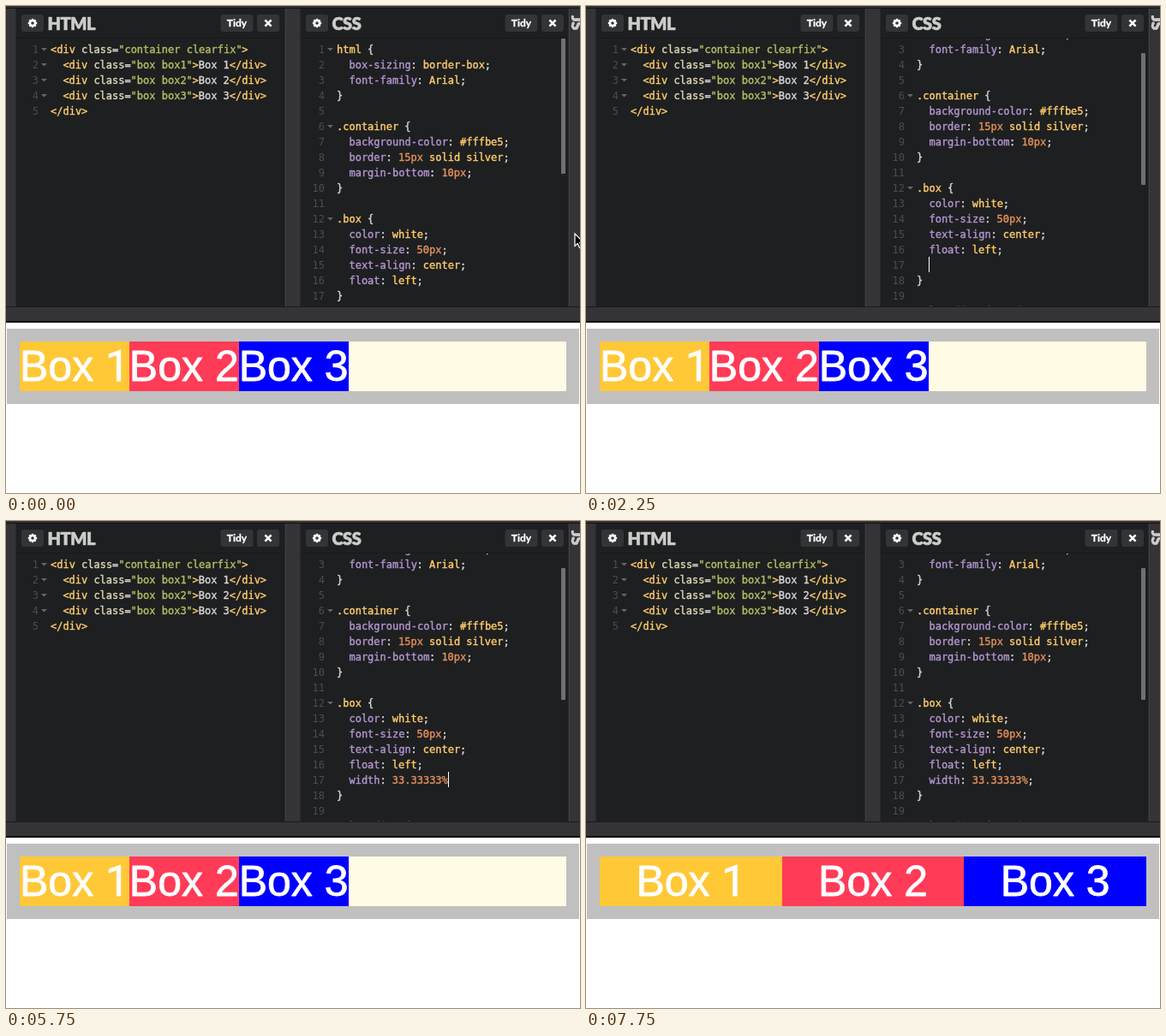
Animation, 670 px wide and 569 px high, one loop 8000 ms. Source, as an HTML page with a canvas:

```html
<!DOCTYPE html>
<html lang="en">
<head>
<meta charset="utf-8">
<title>Box widths</title>
<style>
html, body { margin: 0; width: 100%; height: 100%; overflow: hidden; background: #fff; }
canvas { display: block; }
</style>
</head>
<body>
<canvas id="stage" width="670" height="569"></canvas>
<script>
const ctx = document.getElementById('stage').getContext('2d');
const LOOP = 8000, TICK = 250;
const PITCH = 7.2, LINE = 18, BOTTOM = 351;
const MONO = '12px "DejaVu Sans Mono", monospace';
const TITLE = 'Lato, sans-serif';
const YELLOW = '#ffcb6b', PURPLE = '#b294cf', ORANGE = '#e28f5a',
      GREEN = '#b4bd63', PALE = '#d6d6d6', ATTR = '#ddd6b4';

const markup = [
  '<div class="container clearfix">',
  '  <div class="box box1">Box 1</div>',
  '  <div class="box box2">Box 2</div>',
  '  <div class="box box3">Box 3</div>',
  '</div>'
];
const styles = [
  'html {', '  box-sizing: border-box;', '  font-family: Arial;', '}', '',
  '.container {', '  background-color: #fffbe5;', '  border: 15px solid silver;',
  '  margin-bottom: 10px;', '}', '',
  '.box {', '  color: white;', '  font-size: 50px;', '  text-align: center;',
  '  float: left;', '}', '',
  '.clearfix:after {', '  content: "";'
];
const TYPED_ROW = 16;
const TYPED = 'width: 33.33333%;';
const WIDE_AT = 7000;

// Each track lists [start time, value]; a value holds until the next start.
const scrollTrack = [[0, 0], [500, 4], [750, 28], [1000, 36]];
const pointerTrack = [[0, [664, 266]], [250, [606, 262]], [500, [554, 260]],
  [1000, [524, 275]], [1250, [510, 281]], [1500, null]];
const caretTrack = [[0, false], [1250, true], [1750, false], [2250, true],
  [6750, false], [7250, true], [7750, false]];
const typedTrack = [[0, null], [2250, 0], [2500, 1], [2750, 3], [3000, 5], [3500, 6],
  [3750, 7], [4000, 8], [4250, 9], [4500, 10], [4750, 11], [5000, 13], [5250, 15],
  [5750, 16], [6250, 17]];

const at = (track, t) => track.filter(k => k[0] <= t).pop()[1];

function rect(x, y, w, h, color) {
  ctx.fillStyle = color;
  ctx.fillRect(x, y, w, h);
}

// "weight" thickens the strokes of the letters, in pixels.
function text(str, x, y, font, color, align = 'left', weight = 0) {
  ctx.font = font;
  ctx.textAlign = align;
  ctx.fillStyle = color;
  ctx.fillText(str, x, y);
  if (weight) {
    ctx.strokeStyle = color;
    ctx.lineWidth = weight;
    ctx.lineJoin = 'round';
    ctx.strokeText(str, x, y);
  }
}

function title(str, x, y, size) {
  ctx.letterSpacing = '-0.5px';
  text(str, x, y, `900 ${size}px ${TITLE}`, '#ccc', 'left', 0.6);
  ctx.letterSpacing = '0px';
}

function button(x, w) {
  ctx.fillStyle = '#333436';
  ctx.beginPath();
  ctx.roundRect(x, 10, w, 20, 3);
  ctx.fill();
}

function gear(x, y) {
  ctx.save();
  ctx.translate(x, y);
  ctx.fillStyle = '#fff';
  for (let i = 0; i < 4; i++) {
    ctx.fillRect(-1.2, -5.2, 2.4, 10.4);
    ctx.rotate(Math.PI / 4);
  }
  ctx.beginPath();
  ctx.arc(0, 0, 4, 0, 7);
  ctx.fill();
  ctx.fillStyle = '#333436';
  ctx.beginPath();
  ctx.arc(0, 0, 1.8, 0, 7);
  ctx.fill();
  ctx.restore();
}

function cross(x, y) {
  ctx.strokeStyle = '#fff';
  ctx.lineWidth = 2.6;
  ctx.beginPath();
  ctx.moveTo(x - 3.6, y - 3.6);
  ctx.lineTo(x + 3.6, y + 3.6);
  ctx.moveTo(x + 3.6, y - 3.6);
  ctx.lineTo(x - 3.6, y + 3.6);
  ctx.stroke();
}

function panel(x, w, name) {
  rect(x, 3, w, BOTTOM - 3, '#1d1f20');
  rect(x, 37, w, 1, '#17191a');
  button(x + 6, 26);
  gear(x + 19, 20);
  title(name, x + 36.5, 27.5, 20);
  button(x + 238.5, 38);
  text('Tidy', x + 257.5, 24, `bold 12px ${TITLE}`, '#fff', 'center', 0.3);
  button(x + 281, 26);
  cross(x + 294, 20);
}

function htmlTokens(line) {
  const re = /(<\/?\w+|>)|("[^"]*")|(\w+(?==))|[^<>"]/g;
  return [...line.matchAll(re)].map(m =>
    [m[0], m.index, m[1] ? YELLOW : m[2] ? GREEN : m[3] ? ATTR : PALE]);
}

function cssTokens(line) {
  if (!line.startsWith('  ')) {
    const name = line.match(/^[.\w-]*/)[0];
    return [[name, 0, YELLOW], [line.slice(name.length), name.length, PALE]];
  }
  const prop = line.match(/^  [\w-]*/)[0];
  const re = /(\d[\w.%]*)|("[^"]*")|(#?[a-z][\w-]*)|\S/gi;
  const values = [...line.slice(prop.length).matchAll(re)].map(m =>
    [m[0], m.index + prop.length, m[1] ? ORANGE : m[2] ? GREEN : m[3] ? YELLOW : PALE]);
  return [[prop, 0, PURPLE], ...values];
}

function editor(x, w, lines, tokens, textX, top, folds) {
  ctx.save();
  ctx.beginPath();
  ctx.rect(x, 38, w, BOTTOM - 38);
  ctx.clip();
  lines.forEach((line, i) => {
    const y = top + i * LINE;
    text(i + 1, textX - 14, y + 14, MONO, '#4a4d4f', 'right');
    if (folds(line)) {
      ctx.fillStyle = '#646668';
      ctx.beginPath();
      ctx.moveTo(textX - 11, y + 8);
      ctx.lineTo(textX - 4, y + 8);
      ctx.lineTo(textX - 7.5, y + 11.5);
      ctx.fill();
    }
    for (const [str, col, color] of tokens(line)) {
      text(str, textX + col * PITCH, y + 14, MONO, color, 'left', 0.4);
    }
  });
  ctx.restore();
}

function pointer([x, y]) {
  const shape = [[0, 0], [0, 14.5], [3.3, 11.5], [5.6, 16.6], [8, 15.5],
    [5.8, 10.6], [10.2, 10.4]];
  ctx.beginPath();
  shape.forEach(([dx, dy]) => ctx.lineTo(x + dx, y + dy));
  ctx.closePath();
  ctx.fillStyle = '#000';
  ctx.fill();
  ctx.strokeStyle = '#fff';
  ctx.lineWidth = 1.2;
  ctx.lineJoin = 'miter';
  ctx.stroke();
}

function frameChrome() {
  rect(0, 0, 670, 369, '#343436');
  rect(0, 2, 670, 1, '#111');
  panel(12, 313, 'HTML');
  panel(344, 312, 'CSS');
  for (const x of [11, 325, 343, 656]) rect(x, 3, 1, BOTTOM - 3, '#29292b');
  for (const x of [326, 657]) rect(x, 3, 1, BOTTOM - 3, '#424244');
  ctx.save();
  ctx.translate(659.5, 11);
  ctx.rotate(Math.PI / 2);
  title('JS', 0, 0, 18);
  ctx.restore();
  rect(0, BOTTOM, 670, 1, '#1a1a1b');
  rect(0, 368, 670, 2, '#111');
}

function preview(wide) {
  rect(1, 377, 668, 88, '#c0c0c0');
  rect(16, 392, 638, 58, '#fffbe5');
  const textWidth = 127.85, digitWidth = 27.8;
  const w = wide ? 638 / 3 : textWidth;
  ['#ffc837', '#ff3b58', '#0000ff'].forEach((color, i) => {
    const left = Math.round(16 + i * w), right = Math.round(16 + (i + 1) * w);
    rect(left, 392, right - left, 58, color);
    const x = 16 + i * w + (w - textWidth) / 2;
    const font = '50px "Liberation Sans", Arial, sans-serif';
    text('Box ', x, 438, font, '#fff', 'left', 0.8);
    // Roboto's 1 has no foot.
    const digitFont = i ? font : '50px Roboto, sans-serif';
    text(i + 1, x + textWidth - digitWidth, 438, digitFont, '#fff', 'left', 0.8);
  });
}

function draw(t) {
  const scroll = at(scrollTrack, t);
  const typed = at(typedTrack, t);
  const top = 41 - scroll;
  const lines = styles.slice();
  let row = TYPED_ROW - 1;
  if (typed !== null) {
    row = TYPED_ROW;
    lines.splice(row, 0, '  ' + TYPED.slice(0, typed));
  }

  rect(0, 0, 670, 569, '#fff');
  frameChrome();
  editor(12, 313, markup, htmlTokens, 52, 41, s => s.includes('<div'));
  editor(344, 312, lines, cssTokens, 386, top, s => s.endsWith('{'));

  ctx.fillStyle = '#6f7071';
  ctx.beginPath();
  ctx.roundRect(648, 38 + Math.round(scroll * 0.47), 5, typed === null ? 158 : 154, 1);
  ctx.fill();

  if (at(caretTrack, t)) {
    const x = 386 + lines[row].length * PITCH;
    rect(Math.round(x), top + row * LINE, 1, LINE, '#fff');
  }
  preview(t >= WIDE_AT);
  const pos = at(pointerTrack, t);
  if (pos) pointer(pos);
}

const start = performance.now();
function loop() {
  const t = (performance.now() - start) % LOOP;
  draw(Math.floor(t / TICK) * TICK);
  requestAnimationFrame(loop);
}
loop();
</script>
</body>
</html>
```
